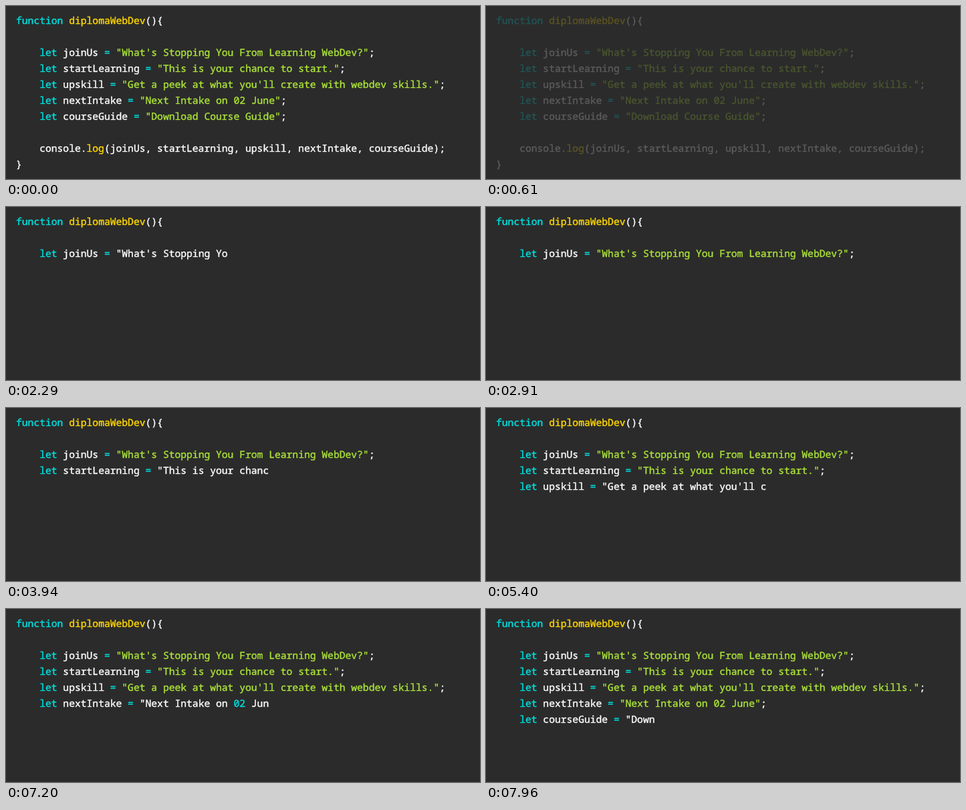
An HTML page for the animation above (8 s loop, 709x260 px).

```html
<!DOCTYPE html>
<html lang="en">
<head>
<meta charset="utf-8">
<title>Typed code</title>
<style>
  html, body { margin: 0; width: 100%; height: 100%; overflow: hidden; background: #2b2b2b; }
  pre {
    position: absolute; left: 15px; top: 10px; margin: 0;
    font: 14.661px/24px "Noto Sans Mono", "DejaVu Sans Mono", monospace;
    font-variant-ligatures: none;
    text-rendering: geometricPrecision;
    -webkit-text-stroke: 0.4px currentColor;
    color: #fefefe;
  }
  .str { color: #abe338; }
  .key { color: #00e0e0; }
  .fn { color: #ffd700; }
</style>
</head>
<body>
<pre id="code"></pre>
<script>
const LOOP = 8000;
const FADE_STEPS = 9;
const SOURCE = `function diplomaWebDev(){

    let joinUs = "What's Stopping You From Learning WebDev?";
    let startLearning = "This is your chance to start.";
    let upskill = "Get a peek at what you'll create with webdev skills.";
    let nextIntake = "Next Intake on 02 June";
    let courseGuide = "Download Course Guide";

    console.log(joinUs, startLearning, upskill, nextIntake, courseGuide);
}`;

// Typing pace: [step, characters shown]
const PACE = [
  [9, 1], [12, 9], [20, 32], [23, 40], [35, 75], [47, 109], [55, 132], [59, 144],
  [71, 178], [76, 192], [83, 211], [88, 225], [90, 230], [99, 255], [105, 272], [113, 294]
];

const TOKENS = /("[^"\n]*")|(\b(?:function|let|with|\d+)\b|[=?])|([a-zA-Z]\w*(?=\())/g;
const CLASSES = ["str", "key", "fn"];
const pre = document.getElementById("code");

// Colours only complete tokens, so an open string stays plain.
function highlight(text) {
  return text.replace(TOKENS, (token, ...groups) => {
    const kind = CLASSES[groups.slice(0, 3).findIndex(g => g !== undefined)];
    return `<span class="${kind}">${token}</span>`;
  });
}

function stepAt(t) {
  return t < 970 ? Math.floor((t - 120) / 70.8) : 12 + Math.floor((t - 962) / 69.2);
}

function charsAt(step) {
  const i = PACE.findIndex(p => p[0] >= step);
  if (i < 0) return PACE[PACE.length - 1][1];
  if (i === 0) return PACE[0][1];
  const [k0, n0] = PACE[i - 1], [k1, n1] = PACE[i];
  return Math.floor(n0 + (n1 - n0) * (step - k0) / (k1 - k0));
}

let shown = null;

function draw(t) {
  const step = stepAt(t);
  if (step === shown) return;
  shown = step;
  const fading = step < FADE_STEPS;
  const count = fading ? SOURCE.length : charsAt(step);
  pre.style.opacity = fading ? 1 - (step + 1) / FADE_STEPS : 1;
  pre.innerHTML = highlight(SOURCE.slice(0, count));
}

const start = performance.now();
function tick() {
  draw((performance.now() - start) % LOOP);
  requestAnimationFrame(tick);
}
tick();
</script>
</body>
</html>
```
